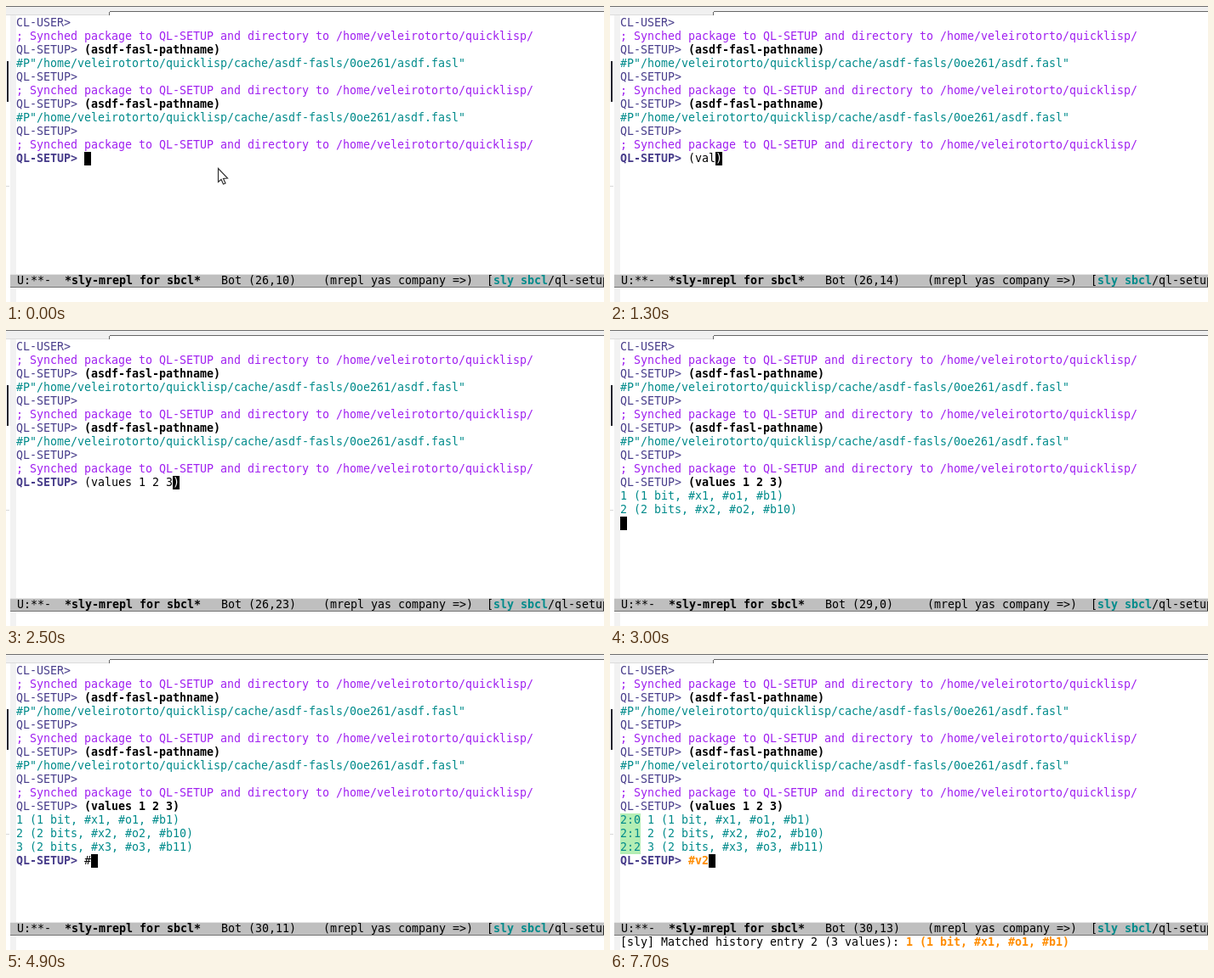
Animation of 703 by 349 pixels, one loop 8000 ms. Source, as an HTML page with a canvas:

```html
<!DOCTYPE html>
<html lang="en">
<head>
<meta charset="utf-8">
<title>Lisp REPL</title>
<style>
html, body { margin: 0; width: 100%; height: 100%; overflow: hidden; background: #fff; }
canvas { display: block; }
</style>
</head>
<body>
<canvas id="stage" width="703" height="349"></canvas>
<script>
const ctx = document.getElementById('stage').getContext('2d');
const LOOP = 8000, CELL = 8, LINE = 16, LEFT = 12, TOP = 12;
const BLACK = '#000', TEAL = '#008b8b', PURPLE = '#a020f0', INDIGO = '#483d8b',
      RED = '#ff0000', ORANGE = '#ff8c00', GREEN = '#b4eeb4';

const HOME = '/home/veleirotorto/quicklisp/';
const NOTE = '; Synched package to QL-SETUP and directory to ' + HOME;
const FASL = `#P"${HOME}cache/asdf-fasls/0oe261/asdf.fasl"`;
const PROMPT = 'QL-SETUP> ';
const CALL = '(values 1 2 3';
const RESULTS = ['1 (1 bit, #x1, #o1, #b1)', '2 (2 bits, #x2, #o2, #b10)', '3 (2 bits, #x3, #o3, #b11)'];

const CALL_KEYS = [500, 900, 900, 1300, 1400, 1500, 1600, 1700, 1900, 2100, 2200, 2400, 2500];
const ENTER = 2800;
const RESULT_TIMES = [2900, 3000, 3100];
const REF_KEYS = [4900, 5500, 7700];

const passed = (times, t) => times.filter(x => x <= t).length;

function rect(x, y, w, h, color) {
  ctx.fillStyle = color;
  ctx.fillRect(x, y, w, h);
}

// Draws text on the character grid and returns the x after it.
function write(x, top, text, color = BLACK, bold = false) {
  ctx.font = `${bold ? 'bold ' : ''}13.29px "DejaVu Sans Mono", monospace`;
  ctx.fillStyle = color;
  for (const ch of text) {
    ctx.fillText(ch, x, top + 12);
    x += CELL;
  }
  return x;
}

const rowTop = row => TOP + row * LINE;

function prompt(row, input = '', active = false) {
  const x = write(LEFT, rowTop(row), PROMPT, INDIGO, active);
  write(x, rowTop(row), input, BLACK, !active);
}

function value(row, text, tag) {
  let x = LEFT;
  if (tag) {
    rect(x, rowTop(row), 3 * CELL, LINE, GREEN);
    x = write(x, rowTop(row), tag + ' ', TEAL);
  }
  write(x, rowTop(row), text, TEAL);
}

function cursor(row, col, under = '') {
  const x = LEFT + col * CELL;
  rect(x, rowTop(row), CELL, LINE, BLACK);
  write(x, rowTop(row), under, '#fff');
}

function surroundings() {
  rect(0, 0, 703, 349, '#fff');
  rect(0, 0, 703, 11, '#f0f0f0');
  rect(0, 0, 703, 1, '#6e6e6e');
  rect(121, 6, 582, 5, '#fff');
  rect(122, 6, 581, 1, '#666');
  rect(121, 7, 1, 4, '#666');
  rect(0, 10, 121, 1, '#dcdcdc');
  rect(5, 11, 7, 338, '#f2f2f2');
  rect(1, 65, 2, 48, '#20202a');
  rect(0, 212, 4, 1, '#d8d8d8');
}

function modeLine(line, col) {
  rect(5, 316, 698, 16, '#bfbfbf');
  rect(5, 316, 698, 1, '#e5e5e5');
  rect(5, 331, 698, 1, '#737373');
  const at = (c, text, color, bold) => write(13 + c * CELL, 316, text, color, bold);
  at(0, 'U:**-');
  at(7, '*sly-mrepl for sbcl*', BLACK, true);
  at(30, `Bot (${line},${col})`);
  at(45, '(mrepl yas company =>)  [');
  at(70, 'sly sbcl', TEAL, true);
  at(78, '/ql-setup');
}

function pointer() {
  ctx.beginPath();
  [[249.5, 191.5], [249.5, 207.5], [253, 204.5], [255.5, 210], [258, 209], [255.5, 203.5], [260.5, 203]]
    .forEach(([x, y]) => ctx.lineTo(x, y));
  ctx.closePath();
  ctx.fillStyle = '#fff';
  ctx.fill();
  ctx.strokeStyle = '#333';
  ctx.lineWidth = 1.2;
  ctx.stroke();
}

function draw(t) {
  const typed = passed(CALL_KEYS, t), shown = passed(RESULT_TIMES, t), ref = passed(REF_KEYS, t);
  surroundings();

  write(LEFT, rowTop(0), 'CL-USER>', INDIGO);
  [1, 5, 9].forEach(row => write(LEFT, rowTop(row), NOTE, PURPLE));
  [2, 6].forEach((row, i) => {
    prompt(row, '(asdf-fasl-pathname)');
    value(row + 1, FASL, ref === 2 && i + ':0');
    prompt(row + 2);
  });

  let row = 10, col = PROMPT.length;
  if (t < ENTER) {
    prompt(row, CALL.slice(0, typed), true);
    col += typed;
    cursor(row, col, typed ? ')' : '');
  } else {
    prompt(row, CALL + ')');
    RESULTS.slice(0, shown).forEach((text, i) => value(11 + i, text, ref > 1 && '2:' + i));
    row = 11 + shown;
    if (shown < RESULTS.length) {
      col = 0;
    } else {
      prompt(row, '', true);
      write(LEFT + col * CELL, rowTop(row), '#v2'.slice(0, ref), [BLACK, BLACK, RED, ORANGE][ref], ref > 1);
      col += ref;
    }
    cursor(row, col);
  }

  modeLine(row + 16, col);
  if (ref === 2) write(LEFT, 332, "[sly] Ambiguous backreference `#v', 5 values possible");
  if (ref === 3) {
    const x = write(LEFT, 332, '[sly] Matched history entry 2 (3 values): ');
    write(x, 332, RESULTS[0], ORANGE, true);
  }
  if (!typed) pointer();
}

const start = performance.now();
function tick() {
  draw((performance.now() - start) % LOOP);
  requestAnimationFrame(tick);
}
tick();
</script>
</body>
</html>
```
